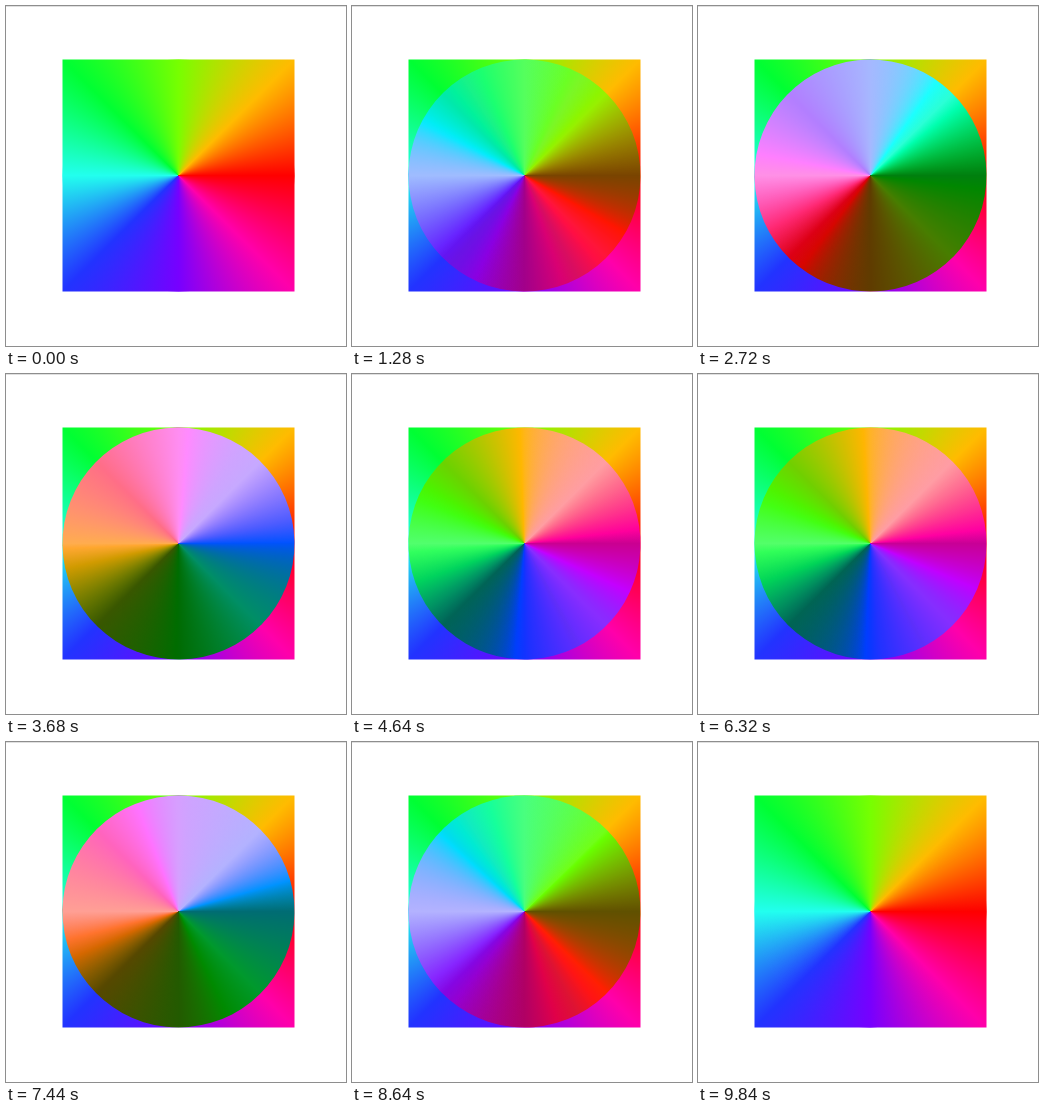
These frames come from a looping animation (340 px wide and 340 px high, 9.92 s). An HTML page:

```html
<!DOCTYPE html>
<html lang="en">
<head>
<meta charset="utf-8">
<title>Hue blend wheel</title>
<style>
  html, body {
    margin: 0;
    width: 100%;
    height: 100%;
    overflow: hidden;
    background: #fff;
  }
  .rule {
    position: absolute;
    inset: 0 0 auto;
    height: 1px;
    background: #e0e0e0;
  }
  .square {
    position: absolute;
    left: 56px;
    top: 53px;
    width: 232px;
    height: 232px;
    transform: translate(0.5px, 0.5px);
    isolation: isolate;
  }
  .square, .wheel {
    background: conic-gradient(from 90deg, #f00, #f0a, #70f, #23f, #2fe, #0f3, #7f0, #fb0, #f00);
  }
  .wheel {
    width: 100%;
    height: 100%;
    border-radius: 50%;
    mix-blend-mode: hue;
  }
</style>
</head>
<body>
<div class="rule"></div>
<div class="square"><div class="wheel" id="wheel"></div></div>
<script>
  const LOOP = 9920;
  const PEAK = 5060;
  const wheel = document.getElementById('wheel');

  // Cubic Bezier easing with end points (0,0) and (1,1)
  function bezier(x1, y1, x2, y2) {
    const at = (a, b, s) =>
      3 * (1 - s) * (1 - s) * s * a + 3 * (1 - s) * s * s * b + s * s * s;
    return x => {
      let lo = 0, hi = 1;
      for (let i = 0; i < 30; i++) {
        const mid = (lo + hi) / 2;
        if (at(x1, x2, mid) < x) lo = mid; else hi = mid;
      }
      return at(y1, y2, (lo + hi) / 2);
    };
  }

  const easeIn = bezier(0.42, 0, 1, 1);
  const easeInOut = bezier(0.42, 0, 0.58, 1);

  // One turn clockwise, then one turn back
  function turn(t) {
    return t < PEAK ? easeIn(t / PEAK) : 1 - easeInOut((t - PEAK) / (LOOP - PEAK));
  }

  function draw(ms) {
    const angle = 360 * turn(ms % LOOP);
    wheel.style.transform = `rotate(${angle.toFixed(3)}deg)`;
  }

  const start = performance.now();
  function tick() {
    draw(performance.now() - start);
    requestAnimationFrame(tick);
  }
  draw(0);
  requestAnimationFrame(tick);
</script>
</body>
</html>
```
